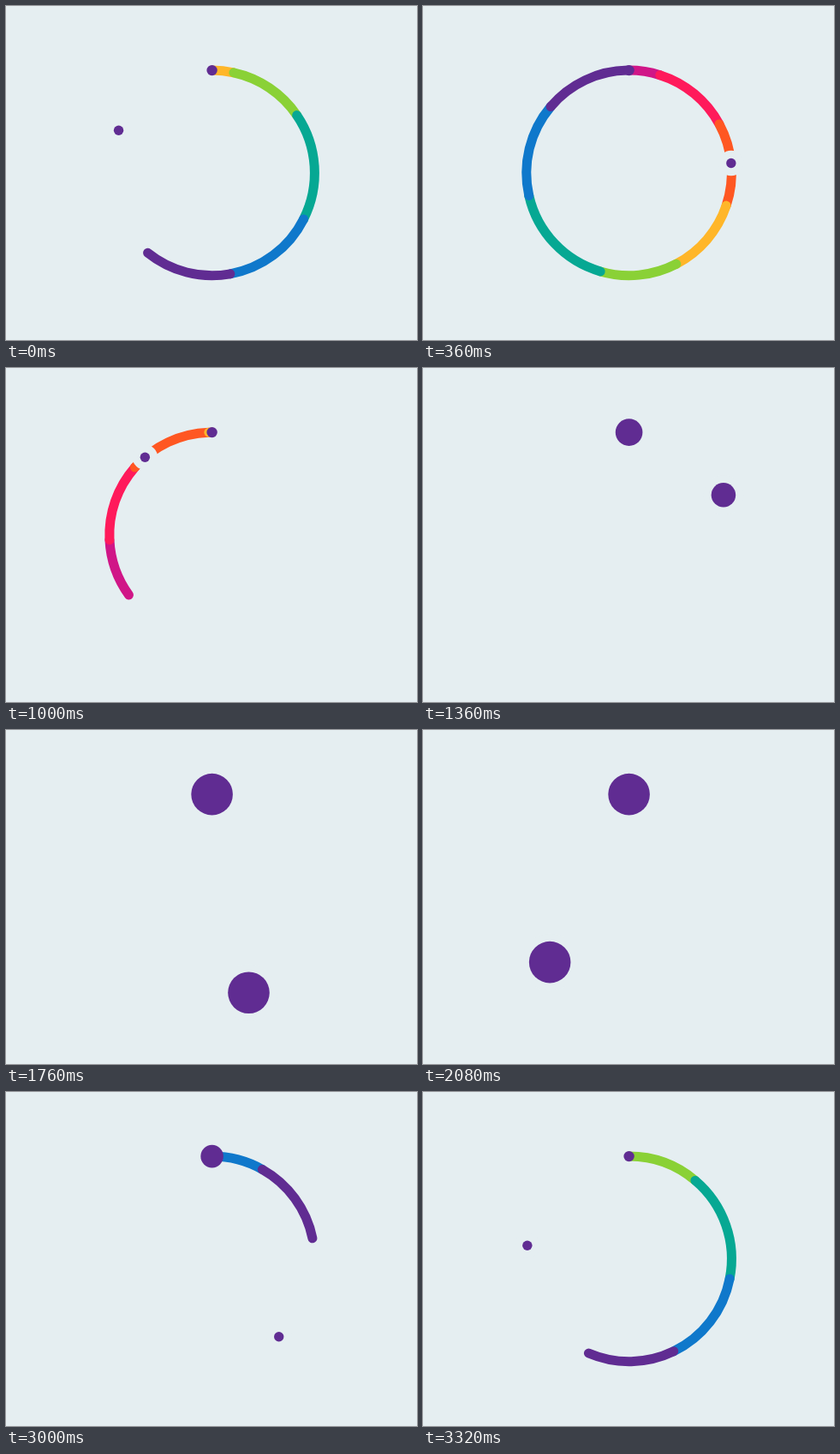
These frames come from a looping animation (480 px wide and 390 px high, 3360 ms). An HTML page with a canvas:

```html
<!DOCTYPE html>
<html lang="en">
<head>
<meta charset="utf-8">
<title>Orbiting ribbon</title>
<style>
  html, body { margin: 0; width: 100%; height: 100%; overflow: hidden; background: #e5eef1; }
  canvas { display: block; }
</style>
</head>
<body>
<canvas id="stage" width="480" height="390"></canvas>
<script>
const ctx = document.getElementById('stage').getContext('2d');
const LOOP = 3360, LAUNCH = 2800;
const CX = 240.6, CY = 194.9, R = 119.8;
const BG = '#e5eef1', PURPLE = '#602c92';
const SPEED = 0.39; // ribbon speed, degrees per ms

// Ribbon colours and lengths in degrees, head first
const ribbon = [
  [PURPLE, 49], ['#0f78cb', 53], ['#06a893', 61], ['#8ad136', 43.6],
  ['#ffb629', 44], ['#ff5722', 47], ['#ff1a5b', 44], ['#d01687', 33]
];

// Orbiting dot: [ms since launch, degrees travelled]
const orbit = [
  [0, 0], [200, 138.7], [520, 277.1], [1280, 582.3],
  [1920, 786.8], [2320, 878.8], [2960, 1015.1], [LOOP, 1080]
];

const rad = deg => (deg - 90) * Math.PI / 180;
const ramp = (t, from, to) => Math.min(1, Math.max(0, (t - from) / (to - from)));

const slopeAfter = i => (orbit[i + 1][1] - orbit[i][1]) / (orbit[i + 1][0] - orbit[i][0]);

function tangent(i) {
  const last = orbit.length - 1;
  if (i === 0) return 1.5 * slopeAfter(0) - 0.5 * tangent(1);
  if (i === last) return 1.5 * slopeAfter(last - 1) - 0.5 * tangent(last - 1);
  const before = orbit[i][0] - orbit[i - 1][0];
  const after = orbit[i + 1][0] - orbit[i][0];
  return (slopeAfter(i - 1) * after + slopeAfter(i) * before) / (before + after);
}

// Cubic Hermite curve through the orbit points
function orbitAngle(t) {
  let i = 0;
  while (i < orbit.length - 2 && t >= orbit[i + 1][0]) i++;
  const [t0, a0] = orbit[i], [t1, a1] = orbit[i + 1];
  const h = t1 - t0, u = (t - t0) / h, v = 1 - u;
  return a0 * (1 + 2 * u) * v * v + a1 * u * u * (3 - 2 * u)
    + h * u * v * (tangent(i) * v - tangent(i + 1) * u);
}

function dot(deg, radius, color) {
  ctx.fillStyle = color;
  ctx.beginPath();
  ctx.arc(CX + R * Math.cos(rad(deg)), CY + R * Math.sin(rad(deg)), radius, 0, 2 * Math.PI);
  ctx.fill();
}

function drawRibbon(t) {
  let front = t * SPEED;
  const parts = ribbon.map(([color, length]) => {
    const part = { color, from: front - length, to: front };
    front -= length;
    return part;
  });
  ctx.lineWidth = 11;
  ctx.lineCap = 'round';
  for (const { color, from, to } of parts.reverse()) {
    const a = Math.max(0, from), b = Math.min(360, to);
    if (a >= b) continue;
    ctx.strokeStyle = color;
    ctx.beginPath();
    ctx.arc(CX, CY, R, rad(a), rad(b));
    ctx.stroke();
  }
}

function draw(now) {
  const t = (now + LOOP - LAUNCH) % LOOP;
  ctx.fillStyle = BG;
  ctx.fillRect(0, 0, 480, 390);
  drawRibbon(t);

  const angle = orbitAngle(t);
  const size = 5.7 + 18.6 * ramp(t, 1700, 2180);
  dot(angle, size + 9, BG);
  dot(angle, size, PURPLE);

  dot(0, 6.2 + 18.1 * (1 - ramp(t, 0, 330) + ramp(t, 1660, 2150)), PURPLE);
}

const start = performance.now();
function tick() {
  draw(performance.now() - start);
  requestAnimationFrame(tick);
}
tick();
</script>
</body>
</html>
```
